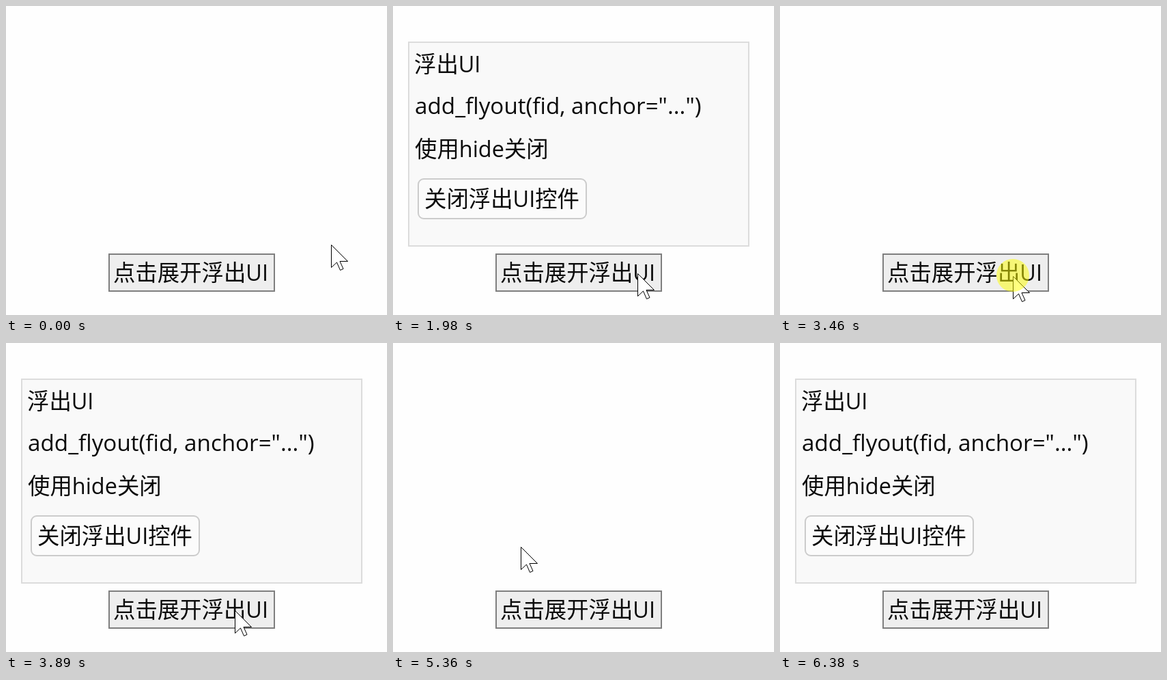
These frames come from a looping animation (558 by 452 pixels, 6950 ms). An HTML page:

```html
<!DOCTYPE html>
<html lang="zh-CN">
<head>
<meta charset="utf-8">
<title>浮出UI</title>
<style>
  html, body { margin: 0; width: 100%; height: 100%; overflow: hidden; background: #fefefe; }
  svg { display: block; }
  text {
    font: 32.4px "Open Sans", "Noto Sans CJK SC", "Noto Sans CJK", sans-serif;
    fill: #0a0a0a;
    white-space: pre;
  }
  .code { font-size: 33.2px; }
</style>
</head>
<body>
<svg width="558" height="452" viewBox="0 0 558 452">
  <clipPath id="reveal"><rect id="window" x="22" width="500"/></clipPath>
  <g id="flyout" clip-path="url(#reveal)">
    <rect class="panel" x="23" width="498" fill="#f9f9f9"/>
    <g id="content">
      <text x="31" y="97">浮出UI</text>
      <text class="code" x="32" y="158">add_flyout(fid, anchor="...")</text>
      <text x="32" y="221">使用hide关闭</text>
      <rect id="close" x="37" y="253" width="246" height="58" rx="8" stroke="#ccc" stroke-width="2"/>
      <text x="46" y="294">关闭浮出UI控件</text>
    </g>
    <rect class="panel" x="23" width="498" fill="none" stroke="#dcdcdc" stroke-width="2"/>
  </g>
  <rect x="151" y="363" width="242" height="54" fill="#eee" stroke="#7f7f7f" stroke-width="2"/>
  <text x="157" y="402">点击展开浮出UI</text>
  <g id="pointer">
    <path d="M.5 .5V33.5L8.5 26L13.5 37.5L18 35.5L13 24.5H24.5Z" fill="#fff" stroke="#000"/>
    <circle id="press" cy="-1" r="24" fill="#ff0" fill-opacity=".5"/>
  </g>
</svg>
<script>
const LOOP = 6950, HEIGHT = 300, TOP = 52;
const SLIDE = 100, HOLD = 50;
const $ = id => document.getElementById(id);
const panels = document.querySelectorAll('.panel');

const moves = [
  { start: 390, end: 750, x: 283, y: 391 },
  { start: 1880, end: 2100, x: 433, y: 391 },
  { start: 3070, end: 3190, x: 341, y: 395 },
  { start: 3890, end: 4200, x: 182, y: 293 },
  { start: 5360, end: 5620, x: 280, y: 391 },
  { start: 6230, end: 6380, x: 438, y: 456 }
];

// Each click toggles the flyout
const clicks = [1290, 2570, 3460, 4760, 5760];

const ease = k => .75 * k * k * (3 - 2 * k) + .25 * k;

// The pointer advances in jumps about 30 ms apart
function pointerAt(t) {
  let x = 476, y = 349;
  for (const m of moves) {
    if (t < m.start) break;
    const span = m.end - m.start;
    const jumps = Math.round(span / 30);
    const step = Math.floor((t - m.start) * jumps / span + 1e-6) + 1;
    const k = ease(Math.min(1, step / (jumps + 1)));
    x += (m.x - x) * k;
    y += (m.y - y) * k;
  }
  return { x: Math.round(x), y: Math.round(y) };
}

function flyoutAt(t) {
  const done = clicks.filter(c => c <= t);
  if (!done.length) return { offset: HEIGHT, cut: HEIGHT, pressed: false };

  const elapsed = t - done[done.length - 1];
  const held = Math.floor(elapsed / HOLD) * HOLD;
  const pressed = elapsed < SLIDE;
  if (done.length % 2) {
    const offset = HEIGHT * Math.max(0, 1 - held / SLIDE);
    return { offset, cut: Math.min(HEIGHT, offset * 1.4), pressed };
  }
  const offset = HEIGHT * Math.min(1, held / SLIDE + .3);
  return { offset, cut: offset, pressed };
}

function draw(t) {
  const { x, y } = pointerAt(t);
  const { offset, cut, pressed } = flyoutAt(t);
  const hover = !offset && x > 36 && x < 284 && y > 252 && y < 312;

  $('pointer').setAttribute('transform', `translate(${x} ${y})`);
  $('press').style.display = pressed ? '' : 'none';
  $('flyout').style.display = cut < HEIGHT ? '' : 'none';
  $('window').setAttribute('y', TOP + cut);
  $('window').setAttribute('height', HEIGHT - cut);
  $('content').setAttribute('transform', `translate(0 ${offset})`);
  $('close').setAttribute('fill', hover ? '#f4f4f4' : '#fbfbfb');
  for (const panel of panels) {
    panel.setAttribute('y', TOP + 1 + offset);
    panel.setAttribute('height', Math.max(0, HEIGHT - 2 - offset));
  }
}

const began = performance.now();
function tick() {
  draw((performance.now() - began) % LOOP);
  requestAnimationFrame(tick);
}
tick();
</script>
</body>
</html>
```
